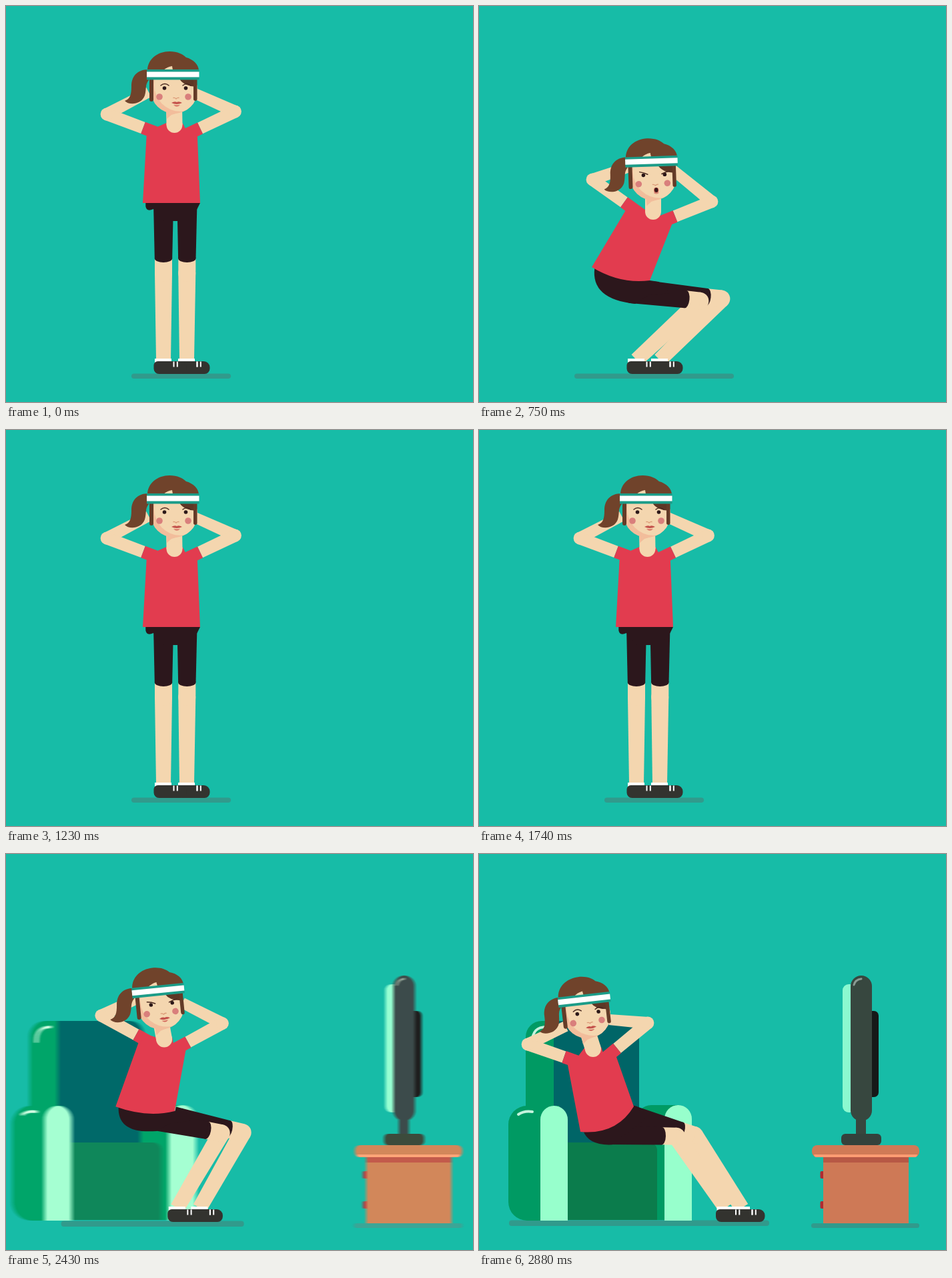
Recreate the animation shown at these times as an HTML page with a canvas. Size 700 by 593 pixels, loop 4 s.

```html
<!DOCTYPE html>
<html lang="en">
<head>
<meta charset="utf-8">
<title>Squat and sit</title>
<style>
  html, body { margin: 0; width: 100%; height: 100%; overflow: hidden; background: #17bca7; }
  canvas { display: block; }
</style>
</head>
<body>
<canvas id="stage" width="700" height="593"></canvas>
<script>
const W = 700, H = 593, LOOP = 4000, STEP = 30;
const THIGH = 106, SHIN = 130, HEM = 84;
const BG = '#17bca7', SKIN = '#f4d6af', SHADE = '#f2bd9b', HAIR = '#70432b', SHIRT = '#e23c4f',
  SHORTS = '#2c171c', SHOE = '#33332f', SHADOW = '#319a8c', TRIM = '#1c9c88';

const stage = document.getElementById('stage').getContext('2d');
let c = stage;

// face: head angle, ponytail angle (degrees), frown, open mouth
const stand = {
  waistL: [205, 295], waistR: [291, 295], hem: [248, 295], seat: [208, 310],
  hipL: [236, 294], hipR: [271.5, 294], ankles: [236, 271],
  armL: [205.5, 182.5], elbowL: [151, 162], handL: [214, 129],
  armR: [291, 183], elbowR: [343.5, 158], handR: [281, 130],
  head: [252, 126], neck: [252.5, 178], shadow: [188, 337], face: [0, 0, 0, 0]
};
const squat = {
  waistL: [169, 391], waistR: [256, 411], hem: [212, 417], seat: [167, 439],
  hipL: [226, 430], hipR: [258, 427], ankles: [236, 271],
  armL: [217.5, 294], elbowL: [170, 260], handL: [225, 241],
  armR: [294, 315], elbowR: [349, 293], handR: [290, 245],
  head: [261, 256], neck: [261, 308], shadow: [143, 382], face: [-2, 0, 1, 1]
};
const fall = {
  waistL: [170, 318], waistR: [260, 334], hem: [216, 330], seat: [171, 357],
  hipL: [215, 333], hipR: [250, 332], ankles: [236, 271],
  armL: [200, 211], elbowL: [148.5, 183], handL: [212, 155],
  armR: [280, 225], elbowR: [334.5, 204], handR: [280, 167],
  head: [250, 168], neck: [245, 218], shadow: [181, 338], face: [10, 19, 0.6, 1]
};
const sit = {
  waistL: [162, 402], waistR: [250, 405], hem: [209, 421], seat: [165, 444],
  hipL: [220, 424], hipR: [252, 417], ankles: [265, 298],
  armL: [193, 294], elbowL: [140.5, 265], handL: [190, 241],
  armR: [270, 304], elbowR: [320.5, 273], handR: [258, 245],
  head: [225, 251], neck: [234, 301], shadow: [44, 364], face: [-12, 0, 1, 0]
};
const lounge = {
  waistL: [152, 416], waistR: [232, 378], hem: [206, 421], seat: [164, 437],
  hipL: [190, 420], hipR: [222, 389], ankles: [369.5, 394],
  armL: [127.5, 304], elbowL: [73, 285], handL: [130, 258],
  armR: [207, 291], elbowR: [253, 253], handR: [195, 248],
  head: [162, 241], neck: [171, 292], shadow: [45, 435], face: [-6.5, -1, 0, 0]
};

const clamp = p => Math.max(0, Math.min(1, p));
const easeIn = p => p * p;
const easeInSlow = p => p * p * p;
const easeOut = p => p * (2 - p);
const smooth = p => p * p * (3 - 2 * p);
// rises slightly past the top before settling
const rise = p => smooth(clamp(p * 1.12)) + 0.016 * Math.sin(Math.PI * clamp((p - 0.75) * 4));

const keys = [
  [0, stand], [270, fall, easeIn], [540, squat, easeOut], [745, squat, smooth],
  [1150, stand, rise], [1800, stand, smooth], [2280, fall, easeInSlow],
  [2600, sit, easeOut], [2640, sit, smooth], [2880, lounge, smooth]
];

const mix = (a, b, p) => a.map((v, i) => v + (b[i] - v) * p);
const add = (a, b, k = 1) => [a[0] + b[0] * k, a[1] + b[1] * k];
const unit = (a, b) => {
  const x = b[0] - a[0], y = b[1] - a[1], d = Math.hypot(x, y) || 1;
  return [x / d, y / d];
};
const perp = d => [-d[1], d[0]];

function poseAt(t) {
  const i = keys.findIndex(k => k[0] > t);
  if (i < 0) return lounge;
  const [t0, from] = keys[i - 1], [t1, to, ease] = keys[i];
  const p = ease((t - t0) / (t1 - t0)), pose = {};
  for (const name in from) pose[name] = mix(from[name], to[name], p);
  return pose;
}

function poly(color, ...pts) {
  c.fillStyle = color;
  c.beginPath();
  pts.forEach(p => c.lineTo(...p));
  c.fill();
}
function shape(color, d) {
  c.fillStyle = color;
  c.fill(new Path2D(d));
}
function stroke(color, width, d) {
  c.strokeStyle = color;
  c.lineWidth = width;
  c.lineCap = c.lineJoin = 'round';
  c.stroke(new Path2D(d));
}
function box(color, x, y, w, h, r = 0) {
  c.fillStyle = color;
  c.beginPath();
  c.roundRect(x, y, w, h, r);
  c.fill();
}
function oval(color, x, y, rx, ry = rx, turn = 0) {
  c.fillStyle = color;
  c.beginPath();
  c.ellipse(x, y, rx, ry, turn, 0, Math.PI * 2);
  c.fill();
}
function limb(color, a, ra, b, rb) {
  const n = perp(unit(a, b));
  poly(color, add(a, n, ra), add(b, n, rb), add(b, n, -rb), add(a, n, -ra));
}

function kneeOf(hip, ankle) {
  const d = Math.hypot(ankle[0] - hip[0], ankle[1] - hip[1]), u = unit(hip, ankle);
  if (d >= THIGH + SHIN) return add(hip, u, d * THIGH / (THIGH + SHIN));
  const along = (THIGH * THIGH - SHIN * SHIN + d * d) / (2 * d);
  const out = Math.sqrt(Math.max(0, THIGH * THIGH - along * along));
  return add(add(hip, u, along), perp(u), -out);
}

function leg(hip, x) {
  const ankle = [x, 530], knee = kneeOf(hip, ankle), u = unit(hip, knee);
  const hem = add(hip, u, HEM);
  limb(SKIN, knee, 13, ankle, 11);
  oval(SKIN, ...knee, 13);
  limb(SKIN, hem, 13, knee, 13);
  oval(SHORTS, ...hem, 6, 13.2, Math.atan2(u[1], u[0]));
  limb(SHORTS, hip, 15, hem, 13.2);
  box('#fff', x - 13, 528, 25, 6);
  return u;
}

function shoe(x) {
  box(SHOE, x - 14.5, 532, 49, 19, [6, 9, 8, 8]);
  for (const dx of [14.5, 19.8]) box('#fff', x + dx, 532.5, 2, 8);
}

function pelvis(p, uL, uR) {
  const start = mix(p.waistL, p.waistR, 0.05);
  const under = add(add(p.hipL, uL, 10), perp(uL), 15);
  c.fillStyle = SHORTS;
  c.beginPath();
  c.moveTo(...start);
  c.quadraticCurveTo(...p.seat, ...under);
  c.lineTo(...add(p.hipL, uL, 28));
  c.lineTo(...add(p.hipR, uR, 28));
  c.lineTo(...add(add(p.hipR, uR, 10), perp(uR), -15));
  c.lineTo(...p.waistR);
  c.fill();
}

function arm(shoulder, elbow, hand) {
  limb(SKIN, elbow, 9, hand, 8);
  limb(SKIN, shoulder, 9, elbow, 9.3);
  oval(SKIN, ...elbow, 9.4);
}

function sleeve(shoulder, elbow, side) {
  const d = unit(elbow, shoulder), n = perp(d).map(v => v * side);
  const inner = add(shoulder, d, 20);
  limb(SHIRT, shoulder, 9.4, inner, 9.4);
  return { pit: add(add(shoulder, d, 9), n, 9.3), top: add(inner, n, -9.3) };
}

function shirt(p) {
  const l = sleeve(p.armL, p.elbowL, 1), r = sleeve(p.armR, p.elbowR, -1);
  c.fillStyle = SHIRT;
  c.beginPath();
  [p.waistL, l.pit, l.top, add(p.neck, [-12, -3]), add(p.neck, [12, -3]), r.top, r.pit, p.waistR]
    .forEach(q => c.lineTo(...q));
  c.quadraticCurveTo(...p.hem, ...p.waistL);
  c.fill();
}

function head(p) {
  const [angle, tail, frown, open] = p.face;
  const rad = Math.PI / 180;
  c.save();
  c.translate(...p.head);
  c.rotate(angle * rad);

  c.save();
  c.translate(-40, -23);
  c.rotate(tail * rad);
  shape(HAIR, 'M2-8C-16-8-24 3-24 17C-24 30-26 36-34 39C-28 46-9 45-4 31C-1 21-4 15 2 8Z');
  c.restore();

  // shaded cheek and chin
  poly(SHADE, [-12, 30], [6, 34], [-4, 37], [-11, 43]);
  oval(SHADE, 0, 0, 35);
  c.save();
  c.beginPath();
  c.arc(0, 0, 35, 0, Math.PI * 2);
  c.clip();
  oval(SKIN, 10, -8, 40);
  c.restore();

  shape(HAIR, 'M-40-29C-40-47-24-58-7-58C5-58 13-54 18-49C29-46 37-38 37-29Z');
  shape(SKIN, 'M-16-30Q-10-35-3-36L-2-30Z');
  shape('#5d3725', 'M8-17Q14-6 34-5V-17Z');
  box('#643b27', -37, -17, 6, 34, [0, 0, 3, 3]);
  box('#643b27', 29, -17, 5.5, 33, [0, 0, 3, 3]);
  box(TRIM, -41, -31, 78.5, 15.5);
  box('#fff', -41, -27.5, 78.5, 8);

  oval('#d97f7c', -22, 10, 4.8);
  oval('#d97f7c', 21, 10, 4.8);
  oval('#2b1718', -14.5, -3, 2.8);
  oval('#2b1718', 17.5, -3, 2.8);

  const brow = (x0, x1, side) => {
    const outer = -7 - frown, inner = -7 + frown * 3;
    const y0 = side < 0 ? outer : inner, y1 = side < 0 ? inner : outer;
    const mid = (y0 + y1) / 2 - 5 * (1 - frown) - frown;
    stroke('#4a2a20', 1.5, `M${x0} ${y0}Q${(x0 + x1) / 2} ${mid} ${x1} ${y1}`);
  };
  brow(-20, -8, -1);
  brow(13, 25, 1);

  stroke('#dc9b78', 1.3, 'M-1 11.5Q1 11 3 13Q5 11 7 11.5');
  if (open > 0.5) {
    stroke('#d98a76', 1.4, 'M1 24Q4 26 7 24');
    oval('#c45850', 4, 20, 3.6, 4);
    oval('#3a1719', 4, 19.7, 2.6, 3.3);
  } else {
    shape('#c4524b', 'M-4 19Q1 16 4 18Q7 16 12 19Q4 23-4 19Z');
    shape('#d4665b', 'M-1 22Q4 23 9 22Q4 27-1 22Z');
  }
  c.restore();
}

function woman(p) {
  arm(p.armL, p.elbowL, p.handL);
  arm(p.armR, p.elbowR, p.handR);
  const uR = leg(p.hipR, p.ankles[1]), uL = leg(p.hipL, p.ankles[0]);
  p.ankles.slice().reverse().forEach(shoe);
  box('#fff', p.ankles[1] + 14.5, 532.5, 2, 8);
  pelvis(p, uL, uR);
  shirt(p);
  const up = add(p.head, [0, 22]);
  limb(SKIN, up, 12, p.neck, 12);
  oval(SKIN, ...p.neck, 12);
  head(p);
}

function chair() {
  box('#009a63', 70, 250, 100, 200, [24, 0, 0, 0]);
  box('#006567', 112, 250, 128, 182, [0, 20, 0, 0]);
  stroke('#c4f3dd', 4, 'M80 281C80 265 87 259 101 259');
  box('#009a63', 236, 376, 64, 172, [22, 0, 0, 0]);
  box('#0b7c4c', 130, 432, 137, 116, [0, 12, 0, 0]);
  box('#97ffcc', 278, 376, 41, 173, [20.5, 20.5, 0, 0]);
  box('#009a63', 44, 377, 76, 172, [28, 0, 0, 28]);
  stroke('#c4f3dd', 4, 'M59 390Q68 384 80 386');
  box('#97ffcc', 92, 377, 41, 172, [20.5, 20.5, 0, 0]);
}

function television() {
  box(SHADOW, 498, 553, 162, 7, 3.5);
  box('#8bf9d0', 545, 195, 20, 192, 9);
  box('#161918', 582, 235, 17, 129, 7);
  box('#37473f', 557, 182, 32, 218, 16);
  stroke('#8b9b94', 3, 'M562 196Q564 188 573 187');
  box('#37473f', 565, 396, 15, 26);
  box('#34423c', 543, 419, 60, 17, 6);
  box('#ce7956', 516, 452, 128, 101);
  box('#b75845', 516, 453, 128, 9);
  for (const y of [475, 520]) box('#b22a30', 511.5, y, 4.5, 11, [2, 0, 0, 2]);
  box('#d07a56', 499, 436, 161, 18, 8);
  box('#ff9d73', 502, 450, 155, 4, [0, 0, 4, 4]);
}

function sprite(paint) {
  const layer = document.createElement('canvas');
  layer.width = W;
  layer.height = H;
  c = layer.getContext('2d');
  if (paint) paint();
  c = stage;
  return layer;
}
const chairPic = sprite(chair), tvPic = sprite(television), blurPic = sprite();
const blur = blurPic.getContext('2d');

const away = t => Math.pow(1 - clamp((t - 2190) / 400), 3);

// slides a picture in, smeared over a short shutter time
function slide(pic, distance, t) {
  const a = distance * away(t - 7), b = distance * away(t + 7), n = 15;
  if (Math.abs(a - b) < 0.5) {
    stage.drawImage(pic, b, 0);
    return;
  }
  blur.globalCompositeOperation = 'source-over';
  blur.clearRect(0, 0, W, H);
  blur.globalCompositeOperation = 'lighter';
  blur.globalAlpha = 1 / n;
  for (let i = 0; i < n; i++) blur.drawImage(pic, a + (b - a) * i / (n - 1), 0);
  blur.globalAlpha = 1;
  stage.drawImage(blurPic, 0, 0);
}

function draw(now) {
  const t = Math.floor(now % LOOP / STEP) * STEP, p = poseAt(t);
  box(BG, 0, 0, W, H);
  const [x0, x1] = p.shadow, y = 550.5 - 2 * clamp((t - 2280) / 300);
  box(SHADOW, x0, y, x1 - x0, 7.5 + (t > 2280 ? 1 : 0), 4);
  if (t > 2190) {
    slide(chairPic, -535, t);
    slide(tvPic, 370, t);
  }
  woman(p);
}

function tick() {
  draw(performance.now());
  requestAnimationFrame(tick);
}
tick();
</script>
</body>
</html>
```
